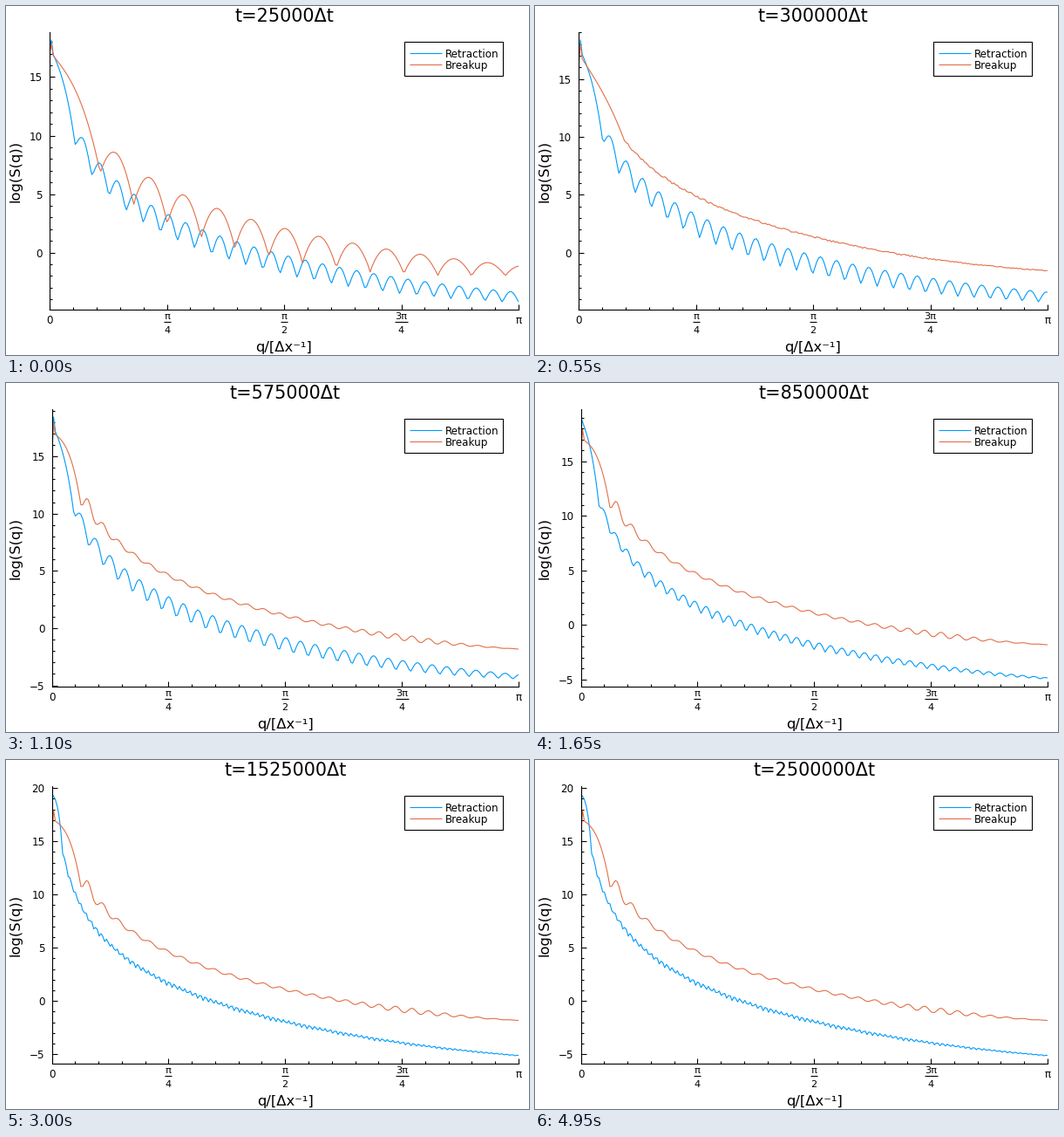
Animation, 600 px wide and 400 px high, one loop 5 s. Source, as a matplotlib script:

```python
import numpy as np
import matplotlib.pyplot as plt
from matplotlib.animation import FuncAnimation
from matplotlib.lines import Line2D
from matplotlib.patches import Rectangle
from matplotlib.ticker import MultipleLocator

W, H, DPI = 600, 400, 100
FRAMES, INTERVAL = 100, 50
TOP, BOTTOM, RIGHT = 30, 348, 588
BLUE, ORANGE = "#009afa", "#e36f47"
PT = 72 / DPI

N = 256
K = np.arange(N + 1)
U = K / N
# Power-law decay of the structure factor, flattening at large q
DECAY = 24.62 - 5.12 * np.log(np.maximum(K, 1)) + .37 * U ** 4

# Time units between the key values of the retraction
STEP = 11
PERIOD = [9.33, 8.81, 8.02, 6.2, 2.85]
DROP = [0, 0, .65, 1.45, 1.7]
DEPTH = [1.95, 1.95, 1.6, .95, .5]
PEAK = [17.6, 17.8, 17.9, 19.05, 19.45]


def lobes(depth, fade, start, period, power):
    """Dips below the envelope; deepest at start, then once per period."""
    arch = np.abs(np.sin(np.pi * (K - start) / period)) ** power
    return depth * (1 - fade * U ** 2) * (arch - 1)


def with_head(body, peak, start, bend, dip, spike):
    """Replace the part before start by a fall from peak down to the body."""
    t = K / start
    foot = np.interp(start, K, body)
    fall = bend * t + (1 - bend) * t ** 3
    y = np.where(t < 1, peak - (peak - foot) * fall, body)
    y[0] -= dip
    y[1] += spike
    return y


def retraction(i):
    p = min(i / STEP, 4)
    period, drop, depth, peak = (np.interp(p, range(5), key)
                                 for key in (PERIOD, DROP, DEPTH, PEAK))
    start = 2.6 + 1.2 * period
    thin = np.clip(3 - p, 0, 1)
    body = DECAY - drop * U ** .1
    body += lobes(depth, .55 + .3 * min(drop, 1), start, period, 1.2)
    return with_head(body, peak, start, .55 - .35 * max(p - 3, 0),
                     (.6 + 1.45 * p) * thin, .9 * thin)


def thread():
    body = DECAY + 2.28 + lobes(3.4, .75, 27.4, 18.45, .85)
    return with_head(body, 17.2, 27.4, .5, .2, .8)


def pieces():
    noise = np.random.default_rng(4).uniform(-.12, .12, N + 1)
    body = DECAY + 1.55 + .3 * U ** 4 + noise * (1 - .7 * U)
    return with_head(body, 17.2, 25, .8, .9, 1)


def settled():
    phase = (K - 71) / 9.05 - .72 * np.exp(-K / 30)
    size = (.8 * np.exp((16 - K) / 10) + .13 * (1 - U ** 6)
            + .15 * np.exp(-((K - 195) / 25) ** 2))
    body = DECAY + 1.27 + .3 * U ** 4 + size * np.cos(2 * np.pi * phase)
    return with_head(body, 17.1, 16, .25, 1.5, .9)


THREAD, PIECES, SETTLED = thread(), pieces(), settled()


def breakup(i):
    if i <= STEP:
        return THREAD + (PIECES - THREAD) * i / STEP
    return PIECES + (SETTLED - PIECES) * min((i - STEP) / 9, 1)


fig = plt.figure(figsize=(W / DPI, H / DPI), dpi=DPI, facecolor="white")
plt.rcParams["font.family"] = "DejaVu Sans"
ax = fig.add_axes([0, 0, 1, 1])
ax.spines[["top", "right"]].set_visible(False)
ax.spines[["left", "bottom"]].set_linewidth(.8)
ax.set_xlim(0, np.pi)
ax.xaxis.set_major_locator(MultipleLocator(np.pi / 4))
ax.xaxis.set_minor_locator(MultipleLocator(np.pi / 20))
ax.yaxis.set_major_locator(MultipleLocator(5))
ax.yaxis.set_minor_locator(MultipleLocator(1))
ax.tick_params(which="major", direction="in", length=4, width=.8)
ax.tick_params(which="minor", direction="in", length=2, width=.8)
ax.tick_params(axis="y", labelsize=11.9 * PT, pad=8 * PT)
ax.tick_params(axis="x", labelbottom=False)

q = K * np.pi / N
blue_line, = ax.plot(q, q, color=BLUE, lw=.8)
orange_line, = ax.plot(q, q, color=ORANGE, lw=.8)


def text(x, y, s, px, **kw):
    kw = {"ha": "center", "va": "baseline", **kw}
    return fig.text(x / W, 1 - y / H, s, fontsize=px * PT, **kw)


def stroke(x0, x1, y, color):
    line = Line2D([x0 / W, x1 / W], [1 - y / H] * 2, color=color, lw=.8,
                  solid_capstyle="butt", transform=fig.transFigure)
    fig.add_artist(line)
    return line


title = text(0, 18.4, "", 20.8)
xlabel = text(0, 396.4, "q/[Δx⁻¹]", 16.4)
text(11, 189, "log(S(q))", 16.4, rotation=90, va="center")

# Artists that follow the axis, with their position as a fraction of it
moving = [(title, .5), (xlabel, .5), (text(0, 364.3, "0", 11.9), 0),
          (text(0, 364.3, "π", 11.9), 1)]
bars = []
for frac, top, bottom, half in [(.25, "π", "4", 4), (.5, "π", "2", 4),
                                (.75, "3π", "4", 7.5)]:
    moving += [(text(0, 359.4, top, 11.3), frac), (text(0, 375, bottom, 11.3), frac)]
    bars.append((stroke(0, 1, 362, "black"), frac, half))

fig.add_artist(Rectangle((457 / W, 1 - 80 / H), 113 / W, 39 / H, fc="white",
                         ec="black", lw=.8, transform=fig.transFigure))
for y, color, name in [(54, BLUE, "Retraction"), (67, ORANGE, "Breakup")]:
    stroke(463, 499.5, y, color)
    text(503.6, y + 4.8, name, 11.9, ha="left")


def draw(i):
    a, b = retraction(i), breakup(i)
    blue_line.set_ydata(a)
    orange_line.set_ydata(b)
    low, high = min(a.min(), b.min()), max(a.max(), b.max())
    pad = .03 * (high - low)
    ax.set_ylim(low - pad, high + pad)

    # The wider "−5" label pushes the axis to the right
    left = 52.5 if low - pad < -5 else 50
    width = RIGHT - left
    ax.set_position([left / W, 1 - BOTTOM / H, width / W, (BOTTOM - TOP) / H])
    title.set_text(f"t={25000 * (i + 1)}Δt")
    for item, frac in moving:
        item.set_x((left + frac * width) / W)
    for bar, frac, half in bars:
        x = left + frac * width
        bar.set_xdata([(x - half) / W, (x + half) / W])
    return []


anim = FuncAnimation(fig, draw, frames=FRAMES, interval=INTERVAL, repeat=True,
                     repeat_delay=0, blit=False)
plt.show()
```
